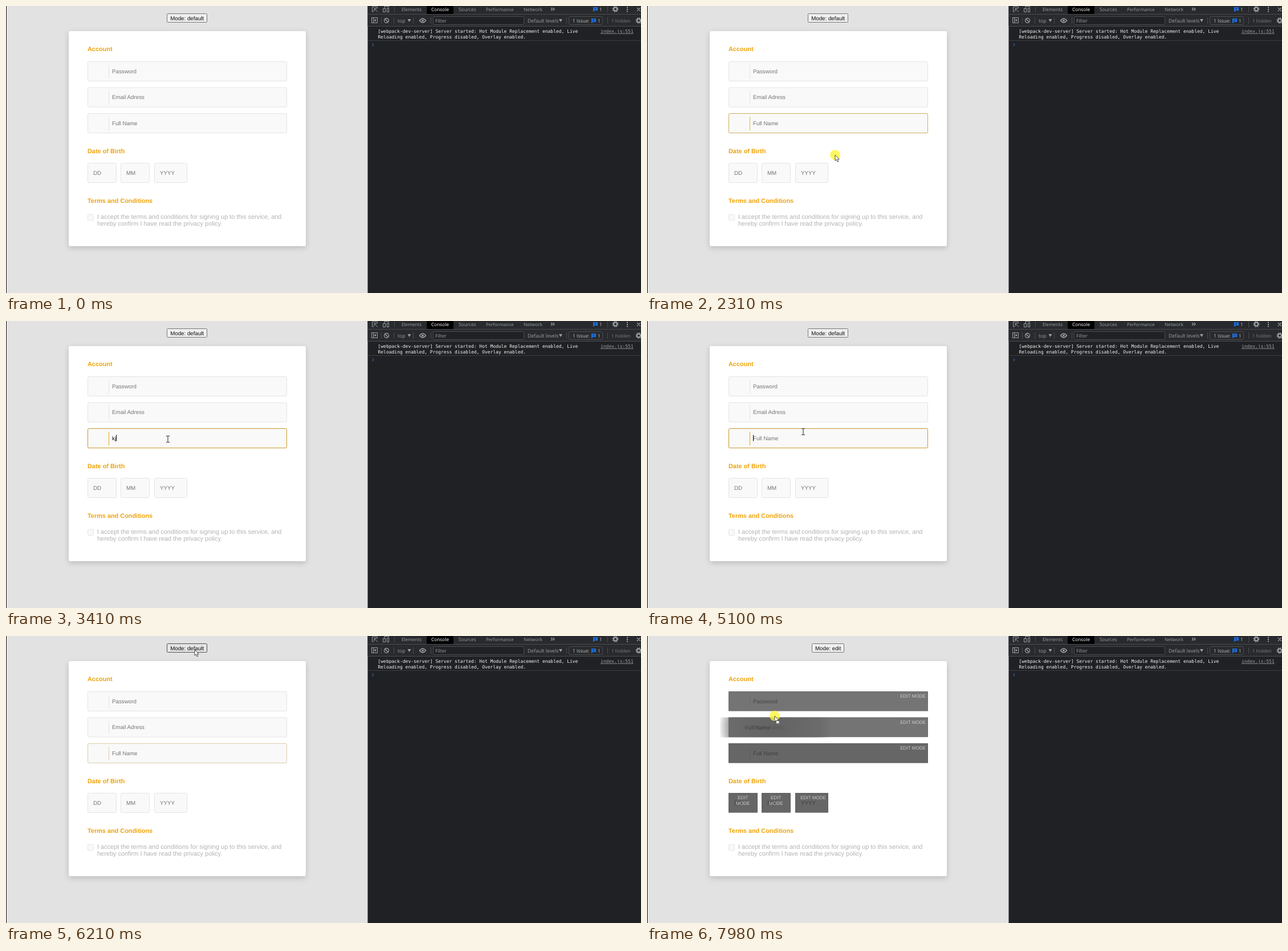
An HTML page that plays this animation: 1114x503 px, repeating every 8 s.

```html
<!DOCTYPE html>
<html lang="en">
<head>
<meta charset="utf-8">
<title>Form editor demo</title>
<style>
  html, body { margin: 0; width: 100%; height: 100%; overflow: hidden; background: #e2e2e2; }
  svg { display: block; }
  text { font-family: "Liberation Sans", Arial, sans-serif; font-size: 9.75px; text-rendering: geometricPrecision; }
  .card { fill: #fff; filter: drop-shadow(0 3px 5px rgba(0, 0, 0, .17)); }
  .title { font-size: 10.9px; font-weight: bold; fill: #f0a30a; }
  .field { fill: #f9f9f9; stroke: #e4e4e4; }
  .hint { fill: #757575; }
  .terms { font-size: 10.95px; fill: #b2b2b2; }
  .cover { fill: #282828; }
  .edit { font-size: 8.1px; fill: #cdcdcd; }
  .tools text { font-family: "Open Sans", "Noto Sans", sans-serif; font-size: 8.3px; fill: #9aa0a6; }
  .tools .log { font-family: "DejaVu Sans Mono", monospace; font-size: 7.99px; fill: #f4f4f4; }
  .tools .link { fill: #9a9fa8; text-decoration: underline; }
  .icon { fill: none; stroke: #9aa0a6; }
  .rule { fill: none; stroke: #494c50; }
</style>
</head>
<body>
<svg id="stage" width="1114" height="503" viewBox="0 0 1114 503">
  <defs>
    <radialGradient id="fade" gradientUnits="userSpaceOnUse" cx="96" cy="17" r="100">
      <stop offset="0" stop-color="#5c5c5c" stop-opacity=".7"/>
      <stop offset=".78" stop-color="#666" stop-opacity=".65"/>
      <stop offset="1" stop-color="#666" stop-opacity="0"/>
    </radialGradient>
    <g id="badge">
      <path d="M0 0h8v6h-5l-3 2.4z" fill="#1a73e8"/>
      <path d="M2 2h4.500M2 4h3" stroke="#202124" stroke-width=".8"/>
    </g>
    <g id="gear" fill="none" stroke="#9aa0a6">
      <circle r="3" stroke-width="2"/>
      <circle r="4.700" stroke-width="1.500" stroke-dasharray="1.850"/>
    </g>
  </defs>

  <rect width="1114" height="503" fill="#e2e2e2"/>
  <rect width="1" height="503" fill="#111"/>
  <rect class="card" x="110" y="44" width="416" height="377" rx="3"/>
  <g id="form"></g>

  <g class="tools">
    <rect x="634.500" width="480" height="503" fill="#202124"/>
    <rect x="634.500" width="480" height="35" fill="#292a2d"/>
    <rect x="738" width="47" height="14.500" fill="#000"/>
    <path class="rule" d="M634.500 14.500H1114M634.500 35.500H1114M681.500 1V11M1055.500 1V11M658.500 20V31M680.500 20V31M714.500 20V31M745.500 20V31M983.500 20V31M1055.500 20V31"/>
    <path d="M635 60.500H1114" stroke="#3a3d41"/>
    <rect class="rule" x="749.500" y="18.500" width="159" height="14" rx="1" style="fill:#202124"/>
    <rect class="rule" x="987.500" y="18.500" width="59" height="14" rx="2"/>
    <g class="icon">
      <path d="M645 10H642.500V1.500H651.500V4M646 4.500l6 6M646 9V4.500H650.500"/>
      <path d="M664 5V.500H671.500V2M661.500 4.500h4v6h-4zM668.500 3.500h3v7h-3z"/>
      <rect x="641.500" y="20.500" width="10" height="9"/>
      <path d="M644.500 21v8" />
      <path d="M646.500 22.500l3.500 2.500-3.500 2.500z" fill="#9aa0a6" stroke="none"/>
      <circle cx="667.500" cy="25.500" r="4" stroke-width="1.300"/>
      <path d="M664.700 22.700l5.600 5.600" stroke-width="1.300"/>
      <path d="M725.500 25.500q5.500-7 11 0q-5.500 7-11 0z" stroke-width="1.300"/>
      <circle cx="731" cy="25.500" r="1.800" fill="#9aa0a6" stroke="none"/>
      <path d="M956 3l2.500 2.500L956 8M959.500 3l2.500 2.500L959.500 8M1107 3l6 6M1113 3l-6 6" stroke-width="1.200"/>
    </g>
    <path d="M704.500 23h6l-3 5zM970 23h6l-3 5z" fill="#9aa0a6"/>
    <path d="M1090 1.500v9" stroke="#9aa0a6" stroke-width="2" stroke-dasharray="2 1.500"/>
    <use href="#badge" x="1030" y="2"/>
    <use href="#badge" x="1027" y="22"/>
    <use href="#gear" x="1069" y="5.500"/>
    <use href="#gear" x="1110" y="25.500"/>
    <g id="labels"></g>
    <path d="M642.500 65.500l2.500 2.500-2.500 2.500" fill="none" stroke="#367cf1"/>
  </g>

  <g id="ghost">
    <rect width="350" height="35" fill="url(#fade)"/>
    <text x="43" y="21" fill="#444">Full Name</text>
  </g>
  <circle id="click" r="9" fill="#fdf53c" opacity=".8"/>
  <g id="arrow">
    <path d="M0 0V10.200L2.300 8.100L4 12L5.800 11.200L4.200 7.500H7.200Z" fill="#fff" stroke="#222" stroke-width=".8"/>
    <rect id="parcel" x="2.500" y="8.500" width="5.500" height="5" fill="#eee" stroke="#666" stroke-width=".8"/>
  </g>
  <path id="beam" d="M-3-5.500h2.300l.7.700.7-.7H3M0-5V5M-3 5.500h2.300l.7-.7.700.700H3" fill="none" stroke="#222" stroke-width="1"/>
  <path id="move" d="M0-6.500L2.500-3.500H1V-1H3.500V-2.500L6.500 0L3.500 2.500V1H1V3.500H2.500L0 6.500L-2.500 3.500H-1V1H-3.500V2.500L-6.500 0L-3.500-2.500V-1H-1V-3.500H-2.500Z" fill="#fff" stroke="#222" stroke-width=".9"/>
</svg>

<script>
const LOOP = 8000;
const $ = id => document.getElementById(id);

function add(parent, tag, attrs, content = '') {
  const node = document.createElementNS('http://www.w3.org/2000/svg', tag);
  for (const key in attrs) node.setAttribute(key, attrs[key]);
  node.textContent = content;
  return parent.appendChild(node);
}
const label = (parent, x, y, content, attrs) => add(parent, 'text', { x, y, ...attrs }, content);

// Form
const form = $('form');
label(form, 143, 79, 'Account', { class: 'title' });
label(form, 143, 257.5, 'Date of Birth', { class: 'title' });
label(form, 143, 345, 'Terms and Conditions', { class: 'title' });
add(form, 'rect', { class: 'field', x: 143.5, y: 365.5, width: 10, height: 10, rx: 1 });
label(form, 160, 372.6, 'I accept the terms and conditions for signing up to this service, and', { class: 'terms' });
label(form, 160, 385.2, 'hereby confirm I have read the privacy policy.', { class: 'terms' });
const button = add(form, 'rect', { y: 13.5, height: 15, rx: 1 });
const buttonText = label(form, 317.7, 24.5, '', { 'text-anchor': 'middle', fill: '#111' });

const covers = [];
function field(x, y, width, hint, indent) {
  const box = add(form, 'rect', { class: 'field', x: x + .5, y: y + .5, width: width - 1, height: 34, rx: 2 });
  const divider = indent > 20 && add(form, 'path', { d: `M${x + 37.5} ${y + 6}v24`, stroke: '#e4e4e4' });
  const text = label(form, x + indent, y + 20.5, hint, { class: 'hint' });
  return { x, y, width, box, divider, text };
}
function cover({ x, y, width }) {
  const group = add(form, 'g', {});
  const rect = add(group, 'rect', { class: 'cover', x, y, width, height: 34.6 });
  const narrow = width < 55;
  const anchor = { class: 'edit', 'text-anchor': narrow ? 'middle' : 'end' };
  const tx = narrow ? x + 25.2 : x + width - 4;
  (narrow ? ['EDIT', 'MODE'] : ['EDIT MODE']).forEach((word, i) =>
    label(group, tx, y + 11.2 + 9.6 * i, word, anchor));
  covers.push({ group, rect });
}
const rows = ['Password', 'Email Adress', 'Full Name'].map((hint, i) => field(143, 97 + 45.5 * i, 350, hint, 43));
const dates = [[143, 51, 'DD'], [201, 51, 'MM'], [260, 58, 'YYYY']].map(([x, w, hint]) => field(x, 275, w, hint, 10));
const nameRow = rows[2];
const focusBox = add(form, 'rect', { x: 143.5, y: 188.5, width: 349, height: 34, rx: 2, fill: 'none', stroke: '#c8982b' });
const focusLine = add(form, 'path', { d: 'M180.500 194v24', stroke: '#dfa01e' });
const caret = add(form, 'path', { stroke: '#111' });
[...rows, ...dates].forEach(cover);

// Developer tools
const tools = $('labels');
[[694, 'Elements', 8.2], [746, 'Console', 8.3, '#fff'], [794, 'Sources', 8.4], [842, 'Performance', 8],
 [908, 'Network', 8.3], [1041, '1', 8.3, '#bdc1c6']]
  .forEach(([x, s, size, fill = '#9aa0a6']) => label(tools, x, 9, s, { style: `font-size:${size}px;fill:${fill}` }));
[[687, 'top', 8.5], [753, 'Filter', 8.5], [915, 'Default levels', 8.7], [994, '1 Issue:', 8.5, '#bdc1c6'],
 [1038, '1', 8.3, '#bdc1c6'], [1062, '1 hidden', 8.2, '#777c82']]
  .forEach(([x, s, size, fill = '#9aa0a6']) => label(tools, x, 28.6, s, { style: `font-size:${size}px;fill:${fill}` }));
label(tools, 652.5, 47, '[webpack-dev-server] Server started: Hot Module Replacement enabled, Live', { class: 'log' });
label(tools, 652.5, 57.4, 'Reloading enabled, Progress disabled, Overlay enabled.', { class: 'log' });
label(tools, 1043, 47, 'index.js:551', { class: 'log link' });

// Pointer moves: first sample, last sample, samples, x, y
const START = [1030, 484];
const MOVES = [
  [160, 340, 5, 437, 234], [580, 850, 8, 236, 208], [1670, 1920, 7, 330, 261],
  [2450, 2740, 8, 284, 207], [5100, 5100, 1, 274, 194], [5137, 5250, 4, 300, -20],
  [5460, 5740, 8, 331, 24], [6740, 6970, 6, 243, 190], [7010, 7250, 7, 239, 204],
  [7800, 7980, 5, 224, 140],
];
const CLICKS = [[1110, 1290], [2180, 2380], [3000, 3180], [5970, 6160], [7760, LOOP]];
const CARETS = [[1130, 1670], [3020, 3660], [4180, 4380], [4700, 5210], [5740, 5980]];
const FOCUS = [[1120, 2230], [3010, 6000]];
const TYPING = [[3210, 'k'], [3410, 'kj'], [4300, 'k'], [4540, '']];

const clamp = v => Math.min(1, Math.max(0, v));
const during = (spans, t) => spans.some(([from, to]) => t >= from && t < to);
const show = (node, on) => node.setAttribute('visibility', on ? 'visible' : 'hidden');
const place = (node, x, y) => node.setAttribute('transform', `translate(${x} ${y})`);

function pointer(t) {
  let [x, y] = START;
  for (const [from, to, count, endX, endY] of MOVES) {
    if (t < from) break;
    const gap = (to - from) / (count - 1) || 1;
    const p = clamp((Math.floor((t - from) / gap + .001) + 1) / count);
    const eased = p * p * (3 - 2 * p);
    x += (endX - x) * eased;
    y += (endY - y) * eased;
  }
  return [x, y];
}

function draw(t) {
  const [x, y] = pointer(t);
  const editing = t >= 6250;
  const dragging = t >= 7800;

  const left = editing ? 289.5 : 282.5;
  const hover = x > left && x < 635 - left && y > 12 && y < 30;
  button.setAttribute('x', left);
  button.setAttribute('width', 635 - 2 * left);
  button.setAttribute('fill', hover ? '#e5e5e5' : '#efefef');
  button.setAttribute('stroke', hover ? '#4f4f4f' : '#767676');
  buttonText.textContent = editing ? 'Mode: edit' : 'Mode: default';

  const glow = Math.max(...FOCUS.map(([on, off]) => Math.min(clamp((t - on) / 300), clamp((off + 300 - t) / 300))));
  focusBox.setAttribute('opacity', editing ? 0 : glow);
  focusLine.setAttribute('opacity', editing ? 0 : glow);

  let typed = '';
  for (const [at, value] of TYPING) if (t >= at) typed = value;
  nameRow.text.textContent = typed || 'Full Name';
  nameRow.text.style.fill = typed ? '#111' : '';
  caret.setAttribute('d', `M${[186.5, 191.5, 193.5][typed.length]} 199.500v11`);
  show(caret, during(CARETS, t));

  const lighten = clamp((t - 7800) / 180);
  covers.forEach(({ group, rect }, i) => {
    show(group, editing);
    rect.setAttribute('opacity', i < 2 ? .7 - .07 * lighten : .7);
  });

  const drift = clamp((t - 7840) / 140);
  place($('ghost'), 143 - 14.5 * drift, 188 - 45.3 * drift);
  show($('ghost'), t >= 7840);

  const overRow = x > 143 && x < 493 && rows.some(row => y >= row.y && y <= row.y + 35);
  const kind = dragging || !overRow ? 'arrow' : editing ? 'move' : 'beam';
  for (const id of ['arrow', 'beam', 'move']) {
    place($(id), x, y);
    show($(id), t >= 160 && id === kind);
  }
  show($('parcel'), dragging);
  place($('click'), x, y);
  show($('click'), during(CLICKS, t));
}

function tick() {
  draw(performance.now() % LOOP);
  requestAnimationFrame(tick);
}
tick();
</script>
</body>
</html>
```
